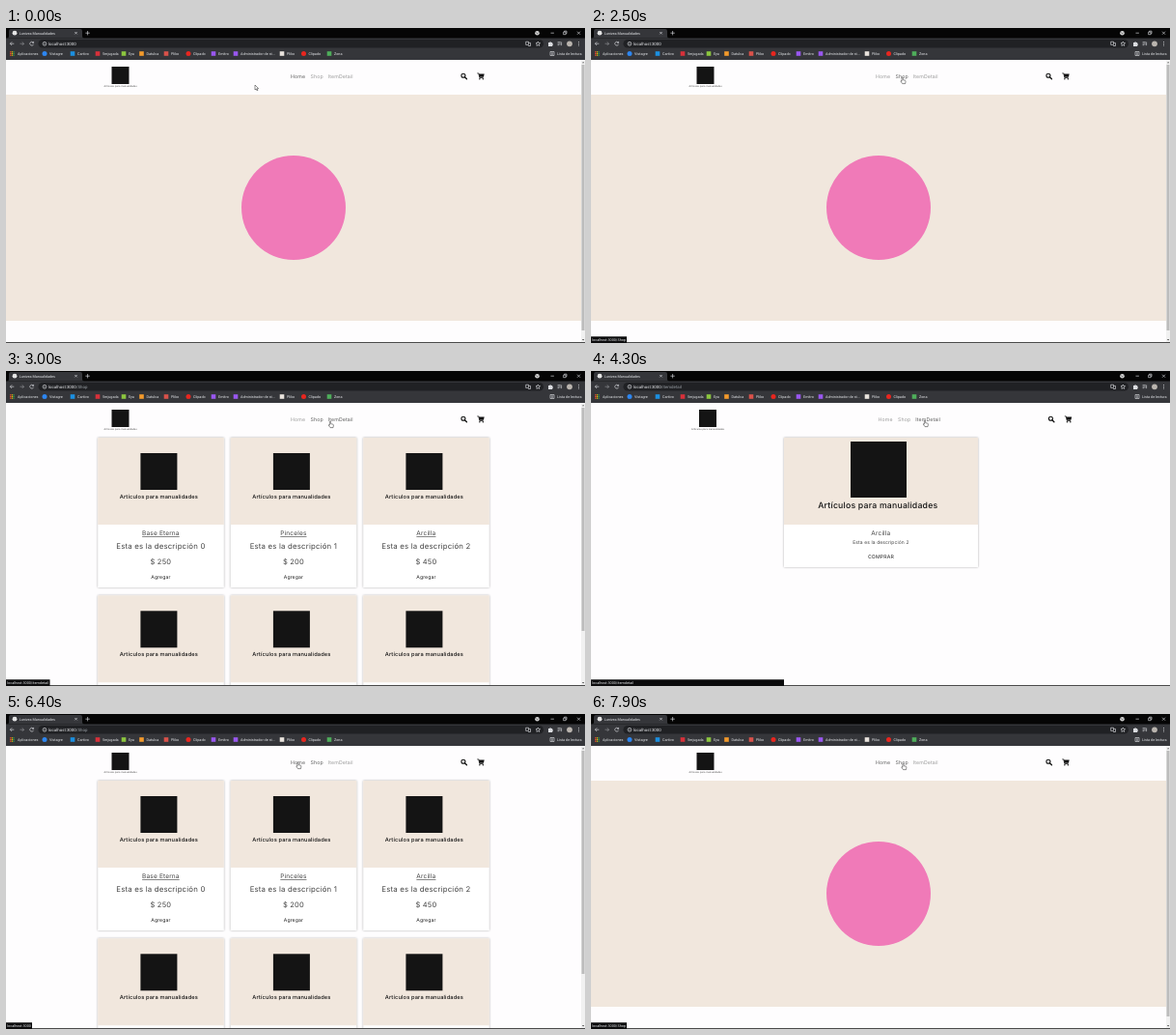
Recreate the animation shown at these times as an HTML page. Size 600 by 326 pixels, loop 8 s.

```html
<!DOCTYPE html>
<html lang="es">
<head>
<meta charset="utf-8">
<title>Lunivea Manualidades</title>
<style>
  html, body { margin: 0; width: 100%; height: 100%; overflow: hidden; background: #fff; }
  svg { display: block; width: 600px; height: 326px; }
  text { text-rendering: geometricPrecision; white-space: pre; }
  .ui { font: 3.75px Roboto, "Open Sans", sans-serif; fill: #e8eaed; }
  .page { font-family: Inter, "Open Sans", sans-serif; letter-spacing: .025em; fill: #444; }
  .mid { text-anchor: middle; }
  .card { filter: drop-shadow(0 .8px 1.1px #0005); }
  .line { fill: none; stroke: #dadce0; stroke-width: .65; }
</style>
</head>
<body>
<svg id="stage" viewBox="0 0 600 326"></svg>
<script>
const LOOP = 8000, STEP = 100;
const BEIGE = '#f1e7dd', INK = '#141414', PINK = '#f07ab8';
const HOST = 'localhost:3000';

const pages = [[0, 'home'], [2600, 'load'], [2900, 'shop'], [4200, 'item'],
  [5400, 'load'], [5700, 'shop'], [6700, 'home']];
const urls = [[0, ''], [2600, '/Shop'], [4200, '/itemdetail'], [5400, '/Shop'], [6700, '']];
const focus = [[0, 0], [2500, 1], [4200, 2], [5400, 1], [6700, 0]];
const hints = [[0, null], [1100, ''], [1300, '/Shop'], [2000, '/itemdetail'], [2400, '/Shop'],
  [3000, '/itemdetail'], [3300, null], [3600, '/itemdetail'], [4900, null], [5400, '/Shop'],
  [6300, ''], [6900, null], [7400, '/Shop']];

// Pointer stops: time, x, y
const path = [
  [0, 258, 59], [100, 236, 108], [300, 256, 186], [400, 256, 186], [700, 256, 76],
  [800, 256, 76], [1100, 301, 52], [1300, 319, 52], [1700, 321, 52], [1800, 321, 52],
  [2000, 344, 51], [2200, 345, 51], [2300, 345, 51], [2400, 323, 51], [2700, 322, 51],
  [2800, 322, 51], [3000, 336, 52], [3300, 318, 130], [3600, 343, 54], [3700, 346, 51],
  [4800, 346, 51], [5100, 312, 170], [5400, 329, 51], [5700, 329, 51], [6000, 470, 190],
  [6300, 309, 54], [6400, 302.5, 50], [6700, 302.5, 50], [7000, 285, 135],
  [7400, 319, 53], [7500, 319, 50.5], [7600, 318, 50.5], [7800, 318, 50.5],
  [7900, 323.5, 51], [8000, 323.5, 51]
];

const $ = id => document.getElementById(id);
const at = (table, t) => table.findLast(row => row[0] <= t)[1];
const rect = (x, y, w, h, fill, more = '') =>
  `<rect x="${x}" y="${y}" width="${w}" height="${h}" fill="${fill}" ${more}/>`;
const dot = (x, y, r, fill) => `<circle cx="${x}" cy="${y}" r="${r}" fill="${fill}"/>`;
const square = (x, y, s, fill) => rect(x - s / 2, y - s / 2, s, s, fill);
const line = (d, more = '') => `<path class="line" d="${d}" ${more}/>`;
const ui = (x, y, s, more = '') => `<text class="ui" x="${x}" y="${y}" ${more}>${s}</text>`;
const type = (x, y, size, s, more = '') =>
  `<text class="page" x="${x}" y="${y}" font-size="${size}" ${more}>${s}</text>`;
const mid = (x, y, size, s, more = '') =>
  `<text class="page mid" x="${x}" y="${y}" font-size="${size}" ${more}>${s}</text>`;

function bookmarks() {
  const list = [
    [40, '#2d86f0', 'Vistagre', 1], [69, '#1b8fe0', 'Cartivo'], [95, '#d8303a', '5mjugada'],
    [122, '#8cc63f', 'Eya'], [140.5, '#f39a2b', 'Datulca'], [166, '#d9524a', 'Pliko'],
    [189, '#e8261f', 'Clipado', 1], [215, '#9a57f0', 'Emitro'],
    [238, '#9a57f0', 'Administrador de st...'], [286, '#e9e3dd', 'Pliko'],
    [308.5, '#e8261f', 'Clipado', 1], [335, '#4fae5b', 'Zona']
  ];
  const tints = ['#ea4335', '#fbbc05', '#34a853', '#4285f4'];
  let out = '';
  for (let i = 0; i < 9; i++)
    out += square(4.6 + i % 3 * 1.7, 24.8 + (i / 3 | 0) * 1.7, 1.2, tints[(i + (i / 3 | 0)) % 4]);
  out += ui(12, 27.8, 'Aplicaciones');
  for (const [x, tint, name, round] of list)
    out += (round ? dot(x, 26.5, 2.5, tint) : square(x, 26.5, 4.6, tint)) + ui(x + 5, 27.8, name);
  return out + line('M564 24.5h4v4h-4zM565 26h2M565 27.2h2') + ui(571, 27.8, 'Lista de lectura');
}

function browser() {
  return rect(0, 0, 600, 33, '#35363a') + rect(0, 0, 600, 10.5, '#050505') +
    '<path d="M1 10.5q2 0 2-2V3q0-2 2-2h72q2 0 2 2v5.5q0 2 2 2z" fill="#35363a"/>' +
    dot(9, 5.2, 2.4, '#e4e4e4') + ui(13.8, 6.7, 'Lunivea Manualidades') +
    line('M71.3 4l2.4 2.4m0-2.4l-2.4 2.4M82.4 5.2h4.4M84.6 3v4.4') +
    dot(550.5, 5.2, 2.3, '#d5d5d5') + line('M549.4 4.8l1.1 1.1 1.1-1.1', 'style="stroke:#222"') +
    line('M564.5 5.2h3.4M577.6 4.2h2.5v2.5h-2.5zM578.5 4.1v-.9h2.5v2.5h-.8M592 3.7l3 3m0-3l-3 3') +
    line('M8.3 16.2h-4m1.8-1.8l-1.8 1.8 1.8 1.8') +
    line('M14.5 16.2h4m-1.8-1.8l1.8 1.8-1.8 1.8', 'opacity=".55"') +
    line('M28.3 15.2a1.9 1.9 0 1 0 .2 1.6M28.6 13.9v1.5h-1.5') +
    rect(33.5, 12, 523.5, 8.6, '#202124', 'rx="4.3"') +
    line('M41.9 16.3a1.9 1.9 0 1 0-3.8 0 1.9 1.9 0 1 0 3.8 0M40 16v1.3M40 15v.4', 'stroke-width=".5"') +
    `<text class="ui" x="44" y="17.9" style="font-size:4.375px">${HOST}<tspan id="url" fill="#9aa0a6"></tspan></text>` +
    line('M538.7 14.2h2.8v3.2h-2.8zM541.6 15.4h1.9v3.1h-2.4') +
    line('M551.3 14l.7 1.5 1.6.2-1.2 1.1.3 1.6-1.4-.8-1.4.8.3-1.6-1.2-1.1 1.6-.2z') +
    '<path d="M562 15h1.3a.8.8 0 0 1 1.6 0h1.3v1.3a.8.8 0 0 1 0 1.6v1.2H562z" fill="#dadce0"/>' +
    line('M571.6 14.7h3.2M571.6 16.2h3.2M571.6 17.7h1.8M575.6 14.5v3.2h-.9') +
    dot(584, 16.3, 2.9, '#b9b4ae') +
    dot(593.5, 14.5, .5, '#dadce0') + dot(593.5, 16.3, .5, '#dadce0') + dot(593.5, 18.1, .5, '#dadce0') +
    bookmarks();
}

function header() {
  const links = [[295, 'Home'], [315.5, 'Shop'], [333.7, 'ItemDetail']];
  return '<g id="header">' + square(118.5, 49, 18, INK) +
    mid(118.7, 61, 2.45, 'Artículos para manualidades') +
    links.map(([x, s], i) => type(x, 52, 5.2, s, `id="link${i}"`)).join('') +
    '<circle cx="473.9" cy="49.2" r="2" fill="none" stroke="#111" stroke-width="1.1"/>' +
    '<path d="M475.4 50.7l2 2" stroke="#111" stroke-width="1.3" stroke-linecap="round"/>' +
    '<path d="M488.3 46.9h1.5l1 4.6h3.8" fill="none" stroke="#111" stroke-width=".8"/>' +
    '<path d="M489.9 47.6h5.8l-.8 3.2h-4.4z" fill="#111"/>' +
    dot(490.9, 52.7, .75, '#111') + dot(494.3, 52.7, .75, '#111') + '</g>';
}

function card(x, y, i) {
  const [name, price] = [['Base Eterna', 250], ['Pinceles', 200], ['Arcilla', 450]][i];
  const c = 65.2;
  return `<g transform="translate(${x} ${y})"><g class="card">${rect(0, 0, 130.6, 155, '#fff')}</g>` +
    rect(0, 0, 130.6, 90, BEIGE) + square(c - 2, 35, 38, INK) +
    mid(c - 2, 63, 5.7, 'Artículos para manualidades', 'font-weight="500" style="fill:#141414"') +
    mid(c, 101, 6.5, name, 'text-decoration="underline"') +
    mid(c, 114.6, 7.8, 'Esta es la descripción ' + i) +
    mid(c, 131, 7.5, '$ ' + price) +
    mid(c, 146, 5.1, 'Agregar', 'style="fill:#222"') + '</g>';
}

function shop() {
  let out = '';
  for (let i = 0; i < 6; i++) out += card(95.2 + i % 3 * 137.5, i < 3 ? 69 : 232.3, i % 3);
  return out;
}

const detail = () =>
  `<g class="card">${rect(200, 69, 201, 134, '#fff')}</g>` + rect(200, 69, 201, 90, BEIGE) +
  square(298, 102, 58, INK) +
  mid(297.3, 142, 8.7, 'Artículos para manualidades', 'font-weight="500" style="fill:#141414"') +
  mid(300.4, 170, 6.5, 'Arcilla') + mid(300.4, 179.2, 4.95, 'Esta es la descripción 2') +
  mid(300.4, 193.6, 5.2, 'COMPRAR', 'style="fill:#222"');

const scrollbar = () => '<g id="bar">' + rect(596, 33, 4, 293, '#f1f1f1') +
  rect(596.5, 38, 3, 275, '#bcbcbc', 'id="thumb"') +
  '<path d="M596.9 36.3l1.2-1.4 1.2 1.4zM596.9 322l1.2 1.4 1.2-1.4z" fill="#555"/></g>';

const pointers =
  '<path id="arrow" d="M0 0v5l1.2-1 .8 1.8.9-.4-.8-1.7h1.6z" fill="#fff" stroke="#222" stroke-width=".5"/>' +
  '<path id="hand" d="M-.6.5q.6-.8 1.2 0v2.2l2.2.5q.7.2.6 1L3 6.6H0L-1.8 4q.1-.8 1.2.1z" fill="#fff" stroke="#222" stroke-width=".5" stroke-linejoin="round"/>';

$('stage').innerHTML = rect(0, 0, 600, 326, '#fefdfe') +
  `<g id="home">${rect(0, 69, 596, 234, BEIGE)}${dot(298, 186, 54, PINK)}</g>` +
  `<g id="shop">${shop()}</g><g id="item">${detail()}</g>` +
  `<g id="load">${type(97.5, 74.3, 4.5, 'Cargando...')}</g>` +
  header() + scrollbar() + rect(0, 325, 600, 1, '#4a4a4a') + browser() +
  `<g id="hint">${rect(0, 319.3, 37, 6.7, '#0b0b0c', 'id="hintBox"')}${ui(1.2, 324, '', 'id="hintText"')}</g>` +
  pointers;

const show = (id, on) => $(id).setAttribute('display', on ? 'inline' : 'none');

function pointer(t) {
  const i = path.findLastIndex(p => p[0] <= t);
  const [t0, x0, y0] = path[i], [t1, x1, y1] = path[i + 1];
  const k = (t - t0) / (t1 - t0);
  return [x0 + (x1 - x0) * k, y0 + (y1 - y0) * k];
}

function draw(now) {
  const t = Math.floor(now % LOOP / STEP) * STEP;
  const page = at(pages, t), hint = at(hints, t);
  const wide = page === 'load' || page === 'item';
  const dx = wide ? 2.5 : 0;

  for (const id of ['home', 'shop', 'item', 'load']) show(id, id === page);
  $('header').setAttribute('transform', `translate(${dx})`);
  show('bar', !wide);
  $('thumb').setAttribute('height', page === 'shop' ? 231 : 275);
  $('url').textContent = at(urls, t);

  const [x, y] = pointer(t);
  const edges = [294, 313, 331.5, 362];
  const over = y > 45 && y < 55 ? edges.findIndex((e, i) => i < 3 && x - dx >= e && x - dx < edges[i + 1]) : -1;
  for (let i = 0; i < 3; i++)
    $('link' + i).style.fill = i === at(focus, t) || i === over ? '#5c5c5c' : '#9a9a9a';
  show('arrow', over < 0);
  show('hand', over >= 0);
  $(over < 0 ? 'arrow' : 'hand').setAttribute('transform', `translate(${x} ${y})`);

  show('hint', hint !== null);
  if (hint !== null) {
    $('hintText').textContent = HOST + hint;
    $('hintBox').setAttribute('width', page === 'item' ? 200 : { '': 27, '/Shop': 37 }[hint] || 45.5);
  }
}

const start = performance.now();
function tick() {
  draw(performance.now() - start);
  requestAnimationFrame(tick);
}
tick();
</script>
</body>
</html>
```
